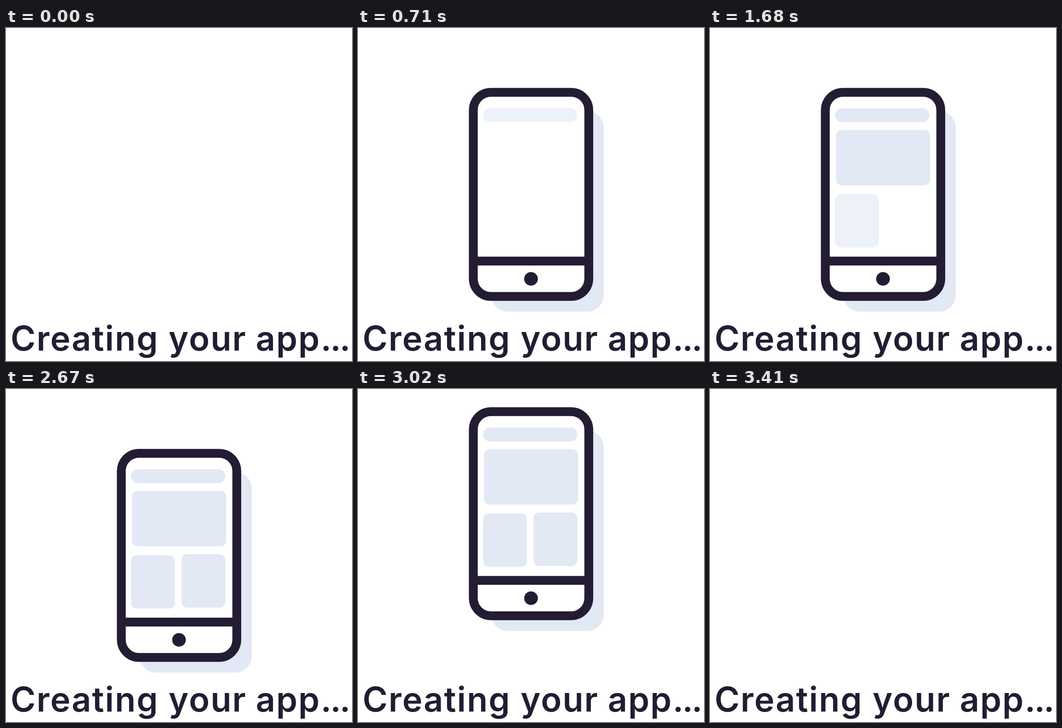
Animation, 762 px wide and 735 px high, one loop 3440 ms. Source, as an HTML page:

```html
<!DOCTYPE html>
<html lang="en">
<head>
<meta charset="utf-8">
<title>Creating your app</title>
<style>
  html, body { margin: 0; width: 100%; height: 100%; overflow: hidden; background: #fff; }
  svg { display: block; width: 762px; height: 735px; }
  text { font: 600 75px Inter, "Open Sans", sans-serif; font-optical-sizing: none; letter-spacing: 2px; }
  .dots { letter-spacing: -3px; }
  .dark { fill: #231c33; }
  .pale { fill: #e2e8f4; }
  .outline { fill: #fff; stroke: #231c33; stroke-width: 19.5; }
</style>
</head>
<body>
<svg viewBox="0 0 762 735">
  <g id="phone" opacity="0">
    <rect class="pale" x="294" y="183.5" width="247" height="442.5" rx="36"/>
    <rect class="outline" x="253.95" y="142.05" width="254.3" height="450.4" rx="39"/>
    <rect class="dark" x="260" y="504.7" width="242" height="19.5"/>
    <circle class="dark" cx="381" cy="553.7" r="15"/>
    <rect class="pale block" x="275.4" y="177.3" width="207.6" height="30.4" rx="15.2"/>
    <rect class="pale block" x="277.4" y="225" width="207.6" height="122.3" rx="13"/>
    <rect class="pale block" x="275.4" y="366.7" width="96.5" height="117.8" rx="13"/>
    <rect class="pale block" x="386.7" y="364.8" width="96.5" height="117.8" rx="13"/>
  </g>
  <text class="dark" y="712"><tspan x="10">Creating </tspan><tspan x="358">your </tspan><tspan x="550">app</tspan><tspan class="dots" x="693">...</tspan></text>
</svg>
<script>
const LOOP = 3440, STEP = 30, PIVOT = { x: 392.5, y: 379 }, LIFT = 92, MIN_SCALE = 0.31;
const BLOCK_STARTS = [440, 960, 1410, 1950];
const phone = document.getElementById('phone');
const blocks = document.querySelectorAll('.block');

// Linear 0..1 progress, advancing in 30 ms steps
function progress(t, start, duration) {
  const elapsed = Math.floor((t - start) / STEP) * STEP;
  return Math.min(1, Math.max(0, elapsed / duration));
}

function render(t) {
  const leave = progress(t, 3020, 390);
  const presence = progress(t, 0, 450) - leave;
  const rise = progress(t, 2840, 180) - leave;
  const scale = MIN_SCALE + (1 - MIN_SCALE) * presence;
  phone.setAttribute('opacity', presence);
  phone.setAttribute('transform',
    `translate(${PIVOT.x} ${PIVOT.y - LIFT * rise}) scale(${scale}) translate(${-PIVOT.x} ${-PIVOT.y})`);
  blocks.forEach((block, i) => block.setAttribute('opacity', progress(t, BLOCK_STARTS[i], 450)));
}

const startTime = performance.now();
function tick() {
  render((performance.now() - startTime) % LOOP);
  requestAnimationFrame(tick);
}
tick();
</script>
</body>
</html>
```
